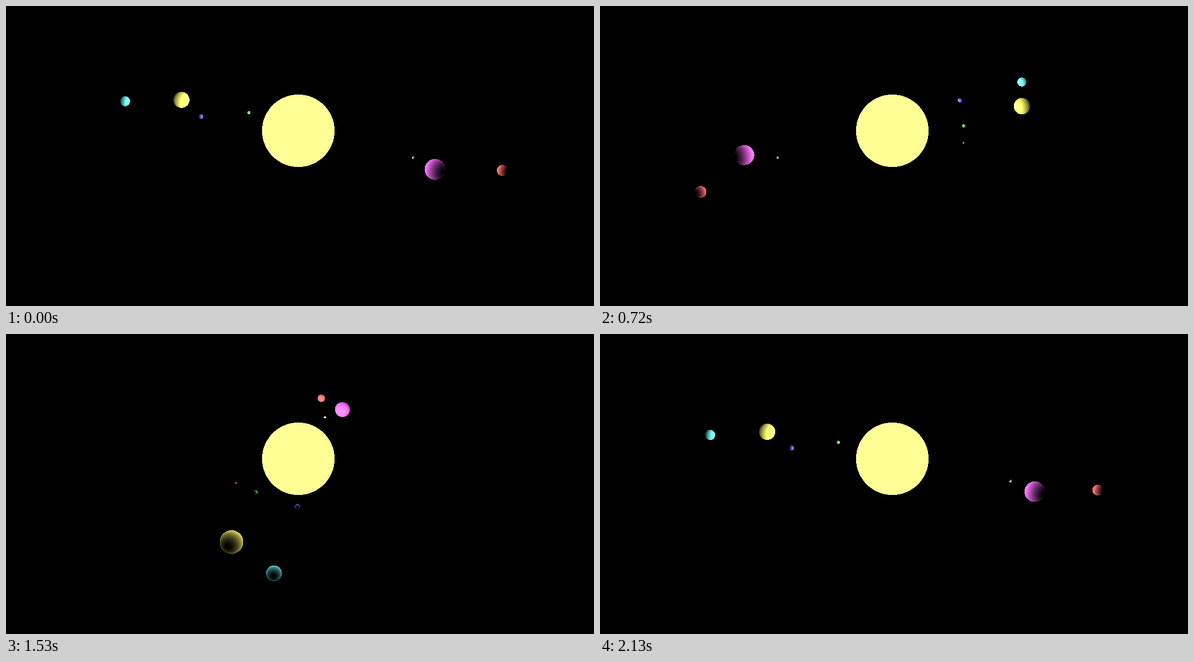
Write an HTML page with a canvas that moves like this. It is 1047x535 px and loops after 2160 ms.

```html
<!DOCTYPE html>
<html lang="en">
<head>
<meta charset="utf-8">
<title>Planets</title>
<style>
  html, body { margin: 0; width: 100%; height: 100%; overflow: hidden; background: #000; }
  canvas { display: block; width: 100vw; height: 100vh; }
</style>
</head>
<body>
<canvas id="stage" width="1047" height="535"></canvas>
<script>
const W = 1047, H = 535;
const LOOP = 2160, STEP = 30;
const CX = 520, CY = 222, SUN = 64.6;
const TILT = 0.415, DEPTH = Math.sqrt(1 - TILT * TILT);
const PERSPECTIVE = 0.000842;
const GLOW = 1.35, TINT = 0.435;
const SLOPE = 0.13, NODE = 208.7;

const ctx = document.getElementById('stage').getContext('2d');
const image = ctx.createImageData(W, H);
const pixels = new Uint32Array(image.data.buffer);
const BLACK = 0xff000000;
const rad = deg => deg * Math.PI / 180;

// The starting places lie on a slightly sloping plane, which sets each height.
function planet(hue, orbit, size, start) {
  const lift = SLOPE * orbit * Math.sin(rad(start - NODE));
  return { hue, orbit, size, lift, phase: rad(start) };
}

const planets = [
  planet('r', 127, 2.1, 250.8),
  planet('g', 135.8, 3.2, 225.4),
  planet('b', 187.5, 4.25, 195.4),
  planet('rgb', 215.3, 2.3, 30),
  planet('rb', 262.5, 16.2, 36.2),
  planet('rg', 284.1, 16.2, 213.9),
  planet('r', 349.8, 8.6, 23.7),
  planet('gb', 361.7, 9.75, 199.8)
];

function shade(hue, light) {
  const channel = name => Math.round(255 * Math.min(1, light * (hue.includes(name) ? 1 : TINT)));
  return (BLACK | channel('b') << 16 | channel('g') << 8 | channel('r')) >>> 0;
}

// light(nx, ny, nz) gives the brightness for a surface normal
function ball(x, y, r, hue, light) {
  for (let py = Math.ceil(y - r); py <= y + r; py++) {
    for (let px = Math.ceil(x - r); px <= x + r; px++) {
      const nx = (px - x) / r, ny = (py - y) / r;
      const rest = 1 - nx * nx - ny * ny;
      if (rest >= 0) pixels[py * W + px] = shade(hue, light(nx, ny, Math.sqrt(rest)));
    }
  }
}

function drawPlanet({ hue, orbit, size, lift, phase }, turn) {
  const cos = Math.cos(phase + turn), sin = Math.sin(phase + turn);
  const near = orbit * sin;
  const d = 1 - near * PERSPECTIVE;
  const x = CX + orbit * cos / d;
  const y = CY + (lift + near * TILT) / d;
  ball(x, y, size / d, hue, (nx, ny, nz) => {
    const facing = -(nx * cos + sin * (ny * TILT + nz * DEPTH));
    return GLOW * Math.pow(Math.max(0, (1 + facing) / 2), 0.9);
  });
}

function render(ms) {
  const turn = Math.floor(ms % LOOP / STEP) * STEP / LOOP * 2 * Math.PI;
  const near = p => p.orbit * Math.sin(p.phase + turn);
  const order = [...planets].sort((a, b) => near(a) - near(b));
  pixels.fill(BLACK);
  order.filter(p => near(p) < 0).forEach(p => drawPlanet(p, turn));
  ball(CX, CY, SUN, 'rg', () => GLOW);
  order.filter(p => near(p) >= 0).forEach(p => drawPlanet(p, turn));
  ctx.putImageData(image, 0, 0);
}

const begin = performance.now();
function tick() {
  render(performance.now() - begin);
  requestAnimationFrame(tick);
}
tick();
</script>
</body>
</html>
```
